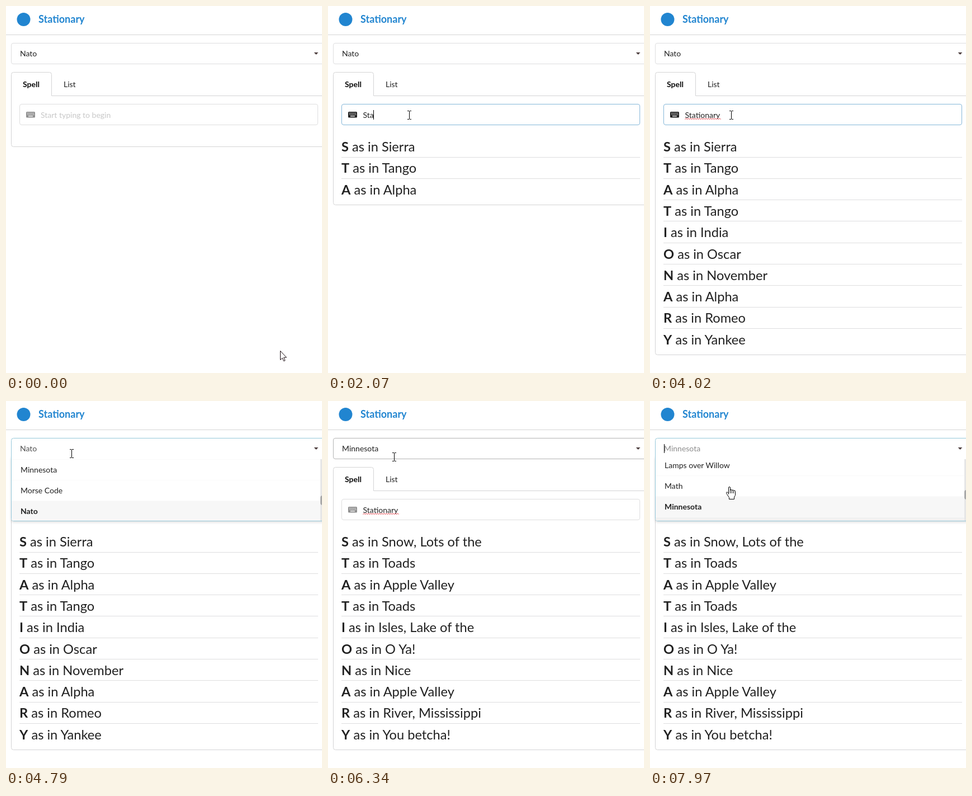
These frames come from a looping animation (565 by 656 pixels, 8 s). An HTML page:

```html
<!DOCTYPE html>
<html lang="en">
<head>
<meta charset="utf-8">
<title>Stationary</title>
<style>
html, body { margin: 0; width: 100%; height: 100%; overflow: hidden; background: #fff; }
svg { display: block; width: 565px; height: 656px; font: 14px Lato, sans-serif; }
.bold { font-weight: 700; }
.menu { filter: drop-shadow(0 2px 2px rgba(34, 36, 38, .15)); }
</style>
</head>
<body>
<svg id="stage" viewBox="0 0 565 656"></svg>
<script>
const LOOP = 8000;
const WORD = 'Stationary';
const NATO = { S: 'Sierra', T: 'Tango', A: 'Alpha', I: 'India', O: 'Oscar', N: 'November', R: 'Romeo', Y: 'Yankee' };
const MINNESOTA = {
  S: 'Snow, Lots of the', T: 'Toads', A: 'Apple Valley', I: 'Isles, Lake of the',
  O: 'O Ya!', N: 'Nice', R: 'River, Mississippi', Y: 'You betcha!'
};
const ITEMS = ['Lamps over Willow', 'Math', 'Minnesota', 'Morse Code', 'Nato'];
const KEYS = [1690, 1840, 2070, 2390, 2540, 2620, 2690, 2770, 2940, 3090];
const FOCUS = 830, OPEN = 4560, PICK = 5790, REOPEN = 7030, SCROLL = 7880;
const ROW = 38.3;
const INK = '#212121', LINE = '#dededf', BLUE = '#96c8da';

// start, end, steps, target x, target y
const MOVES = [
  [70, 450, 6, 146, 200],
  [600, 600, 1, 146, 199],
  [830, 1070, 4, 145, 195],
  [4100, 4560, 7, 117, 94],
  [5020, 5500, 7, 124, 125],
  [5870, 6650, 11, 117, 96],
  [6730, 6880, 3, 117, 94],
  [7100, 7800, 10, 141, 154]
];

const stage = document.getElementById('stage');
const pen = document.createElement('canvas').getContext('2d');
const clamp = v => Math.max(0, Math.min(1, v));
const within = (v, a, b) => v >= a && v < b;

const text = (x, y, s, fill = INK, extra = '') => `<text x="${x}" y="${y}" fill="${fill}" ${extra}>${s}</text>`;
const box = (x, y, w, h, fill, extra = '') => `<rect x="${x}" y="${y}" width="${w}" height="${h}" fill="${fill}" ${extra}/>`;
const path = (d, stroke, extra = '') => `<path d="${d}" fill="none" stroke="${stroke}" ${extra}/>`;

function measure(s) {
  pen.font = '14px Lato, sans-serif';
  return pen.measureText(s).width;
}

function pointer(t) {
  let x = 490, y = 616;
  for (const [start, end, steps, tx, ty] of MOVES) {
    if (t < start) break;
    const step = end > start ? Math.floor((t - start) / (end - start) * (steps - 1) + 1e-6) + 1 : steps;
    const k = clamp(step / steps), e = k * (2 - k);
    x += (tx - x) * e;
    y += (ty - y) * e;
  }
  return { x: Math.round(x), y: Math.round(y) };
}

function menuScale(t) {
  if (t >= REOPEN) return 1;
  if (t >= PICK) return clamp((5945 - t) / 200);
  return clamp((t - OPEN) / 200);
}

function cursor({ x, y }, open) {
  const onField = within(y, 66, 104) || (!open && within(y, 175, 213) && within(x, 24, 558));
  const onLink = open ? within(y, 104, 215) : within(y, 118, 160) && within(x, 82, 146);
  let shape;
  if (onField) {
    shape = path('M-3-7.5H0M1-7.5H4M.5-7V7M-3 7.5H0M1 7.5H4', '#000');
  } else if (onLink) {
    shape = '<path d="M-.5 12.5V1a1.5 1.5 0 0 1 3 0V6a1.5 1.5 0 0 1 3 0V6.5a1.5 1.5 0 0 1 3 0V7.5a1.5 1.5 0 0 1 3 0V14.5L9.5 18V21.5H.5V18.5L-3.5 12.5q-1.7-2.8-.2-3.7 1-.6 3.2 2.2Z" fill="#fff" stroke="#000"/>' +
      path('M2.5 6V11M5.5 6.5V11M8.5 7.5V11', '#000');
  } else {
    shape = '<path d="M.5.5V16.5L4.2 13.2 6.7 18.7 9 17.7 6.6 12.2H11.5Z" fill="#fff" stroke="#1b0d12"/>';
  }
  return `<g transform="translate(${x} ${y})">${shape}</g>`;
}

function header() {
  return '<circle cx="31.5" cy="24" r="12" fill="#2185d0"/>' +
    text(58, 30, WORD, '#2185d0', 'class="bold" font-size="18"') +
    box(0, 51, 565, 1, '#d4d4d5');
}

function tabs(rows) {
  const bottom = (rows ? Math.round(278.3 + ROW * (rows - 1)) : 251) + .5;
  return path('M81.5 160.5V122.5q0-4-4-4H13.5q-4 0-4 4' +
    `V${bottom - 4}q0 4 4 4H570M81.5 160.5H570`, '#d4d4d5') +
    text(30, 145, 'Spell', '#0d0d0d', 'class="bold"') + text(103, 145, 'List');
}

function keyboard(alpha) {
  let holes = '';
  for (let r = 0; r < 2; r++)
    for (let c = 0; c < 5; c++) holes += box(38 + c * 2.6 + r * .5, 190.8 + r * 2.6, 1.3, 1.3, '#fff');
  return `<g opacity="${alpha}">` + box(36, 189, 16, 10.5, '#212121', 'rx="1.5"') +
    holes + box(40, 196.2, 8, 1.3, '#fff') + '</g>';
}

function field(t, typed) {
  const focused = t >= FOCUS && t < OPEN;
  const fade = focused ? clamp((t - FOCUS + 80) / 300) : 0;
  const grey = Math.round(200 - 66 * fade);
  const width = measure(typed);
  let out = box(24.5, 175.5, 533, 37, '#fff', `rx="3.5" stroke="${focused ? '#85b7d9' : LINE}"`) + keyboard(.5 + .5 * fade);
  out += typed ? text(62.5, 200, typed) : text(62, 200, 'Start typing to begin', `rgb(${grey},${grey},${grey})`);
  if (t >= 4020) {
    let wave = 'M62.5 202.5';
    for (let i = 0; i * 2 < width; i++) wave += `l2 ${i % 2 ? 1.5 : -1.5}`;
    out += path(wave, '#e5343d');
  }
  if (within(t, 910, 1380) || within(t, KEYS[0], 3550))
    out += box(Math.round(62 + width), 186, 1, 17, '#000');
  return out;
}

function spelling(typed, words) {
  return [...typed].map((ch, i) => {
    const key = ch.toUpperCase();
    const rule = i < typed.length - 1 ? box(24, Math.floor(270 + ROW * i), 534, 1, '#dededf') : '';
    return text(24, Math.round(260 + ROW * i), `<tspan class="bold">${key}</tspan> as in ${words[key]}`, INK, 'font-size="23.65"') + rule;
  }).join('');
}

function dropdown(t, p, scale) {
  const picked = t >= PICK ? 'Minnesota' : 'Nato';
  const open = scale > 0;
  const hover = within(p.y, 66, 104);
  const edge = open ? BLUE : hover ? '#b3b4b4' : LINE;
  let out = '';
  if (open) {
    const scroll = t < SCROLL ? 0 : Math.min(66, 20 + (t - SCROLL) * .512);
    const hot = t >= SCROLL ? 3 : p.y > 104 ? Math.floor((p.y - 105) / 37) + 2 : -1;
    const list = ITEMS.map((name, i) => {
      const top = 105 + (i - 2) * 37 + scroll, on = name === picked;
      const fill = i === hot ? '#f1f1f1' : on ? '#f7f7f7' : '#fff';
      return box(10, top, 560, 37, fill) + box(10, top - 1, 560, 1, '#fafafa') +
        text(26, top + 23, name, INK, on ? 'class="bold"' : '');
    }).join('');
    out += `<g class="menu" opacity="${scale}" transform="translate(0 ${104 * (1 - scale)}) scale(1 ${scale})">` +
      `<path d="M9.5 100V210.5q0 4 4 4H580V100Z" fill="#fff" stroke="${BLUE}"/>` +
      '<clipPath id="view"><path d="M10 104V211q0 3 3 3H570V104Z"/></clipPath>' +
      `<g clip-path="url(#view)">${list}` + box(562, 104, 10, 110, '#e6e6e6') +
      box(562, 169 - scroll * .15, 10, 17, '#a9a9a9', 'rx="4"') + '</g></g>';
  }
  out += open
    ? `<path d="M9.5 104V70.5q0-4 4-4H580V104" fill="#fff" stroke="${edge}"/>`
    : box(9.5, 66.5, 600, 37, '#fff', `rx="3.5" stroke="${edge}"`);
  const tone = t >= REOPEN ? '#8c8c8c' : open && t < PICK ? '#505050' : INK;
  out += text(25, 90, picked, tone) + '<path d="M550.7 83H558.3L554.5 87Z" fill="#4a3b3b"/>';
  if (t >= REOPEN && Math.floor((t - REOPEN) / 460) % 2 === 0) out += box(25, 77, 1, 16, '#000');
  return out;
}

let last = '';
function draw(t) {
  const typed = WORD.slice(0, KEYS.filter(k => t >= k).length);
  const p = pointer(t), scale = menuScale(t);
  const html = header() + tabs(typed.length) + field(t, typed) +
    spelling(typed, t >= PICK ? MINNESOTA : NATO) + dropdown(t, p, scale) +
    cursor(p, scale > 0 && !within(t, PICK, REOPEN));
  if (html !== last) stage.innerHTML = last = html;
}

const begin = performance.now();
function tick() {
  draw((performance.now() - begin) % LOOP);
  requestAnimationFrame(tick);
}
tick();
</script>
</body>
</html>
```
